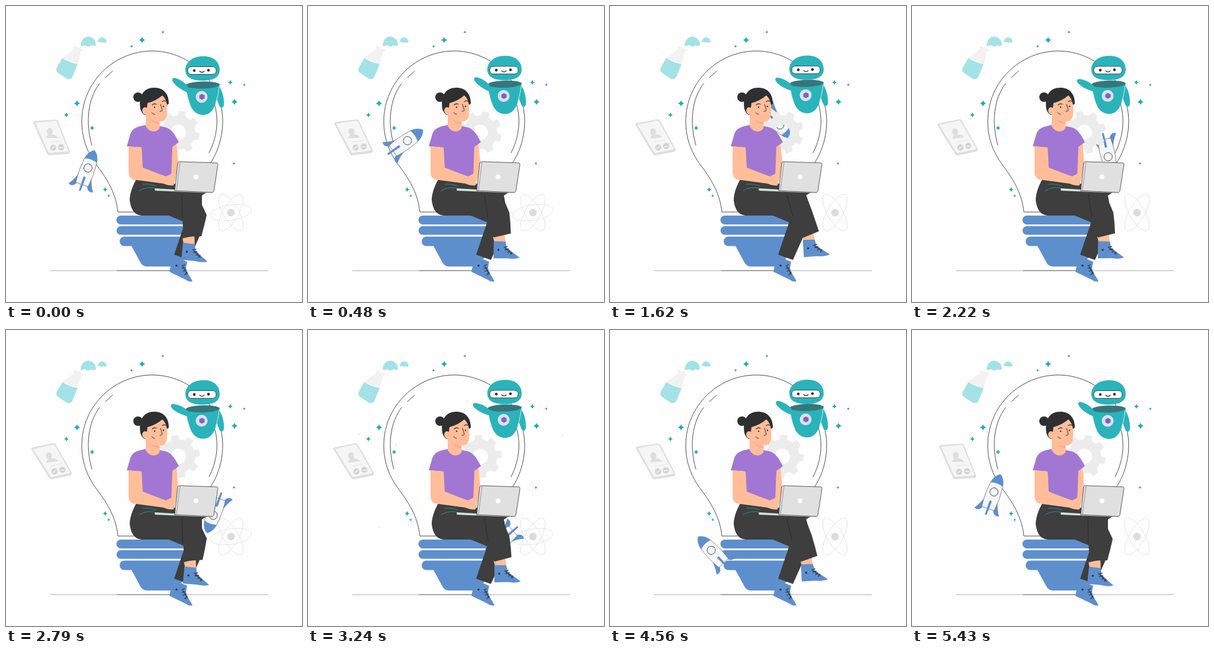
Animation, 500 px wide and 500 px high, one loop 5490 ms. Source, as an HTML page with a canvas:

```html
<!DOCTYPE html>
<html lang="en">
<head>
<meta charset="utf-8">
<title>Idea bulb</title>
<style>
html, body { margin: 0; width: 100%; height: 100%; overflow: hidden; background: #fefefe; }
canvas { display: block; width: 500px; height: 500px; }
</style>
</head>
<body>
<canvas id="stage"></canvas>
<script>
const LOOP = 5490, CYCLE = 5430, SWING = CYCLE / 2;
const BLUE = '#5e8fcd', TEAL = '#2bb3bb', SKIN = '#ffbe99', DARK = '#3e3e3e', INK = '#2d2f31';
const canvas = document.getElementById('stage');
const ctx = canvas.getContext('2d');
const dpr = window.devicePixelRatio || 1;
canvas.width = canvas.height = 500 * dpr;

const paths = {};
const path = d => paths[d] || (paths[d] = new Path2D(d));
const lerp = (a, b, k) => a + (b - a) * k;

function fill(color, d) {
  ctx.fillStyle = color;
  ctx.fill(path(d));
}
function line(color, width, d) {
  ctx.strokeStyle = color;
  ctx.lineWidth = width;
  ctx.stroke(path(d));
}
function oval(color, x, y, rx, ry = rx, tilt = 0) {
  ctx.beginPath();
  ctx.ellipse(x, y, rx, ry, tilt, 0, Math.PI * 2);
  ctx.fillStyle = color;
  ctx.fill();
}
function ring(color, width, x, y, rx, ry = rx, tilt = 0) {
  ctx.beginPath();
  ctx.ellipse(x, y, rx, ry, tilt, 0, Math.PI * 2);
  ctx.strokeStyle = color;
  ctx.lineWidth = width;
  ctx.stroke();
}
function posed(x, y, degrees, draw) {
  ctx.save();
  ctx.translate(x, y);
  ctx.rotate(degrees * Math.PI / 180);
  draw();
  ctx.restore();
}
// turn a drawing about a pivot given in stage coordinates
function turned(x, y, degrees, draw) {
  posed(x, y, degrees, () => { ctx.translate(-x, -y); draw(); });
}

// time, x, y, heading
const flight = [
  [0, 138.5, 273.5, -70], [960, 214, 194, 0], [1620, 287, 201, 43],
  [2790, 350, 313, 110], [3720, 272, 394, 172], [4560, 171, 372, 226]
];
function flightKey(i) {
  const n = flight.length, lap = Math.floor(i / n);
  const [t, x, y, a] = flight[i - lap * n];
  return [t + lap * CYCLE, x, y, a + lap * 360];
}
function flightAt(t) {
  let i = 0;
  while (flightKey(i + 1)[0] <= t) i++;
  const [p, a, b, n] = [-1, 0, 1, 2].map(o => flightKey(i + o));
  const span = b[0] - a[0], k = (t - a[0]) / span;
  return [1, 2, 3].map(c => {
    const va = (b[c] - p[c]) / (b[0] - p[0]) * span;
    const vb = (n[c] - a[c]) / (n[0] - a[0]) * span;
    const k2 = k * k, k3 = k2 * k;
    return (2 * k3 - 3 * k2 + 1) * a[c] + (k3 - 2 * k2 + k) * va
      + (3 * k2 - 2 * k3) * b[c] + (k3 - k2) * vb;
  });
}

function bulb() {
  line('#4a4a4a', 1, 'M225 348H189C186 320 175 298 154 270C135 245 128 220 128 195C128 128 183 76 247 76C312 76 366 130 366 195C366 225 355 255 340 272');
  line('#4a4a4a', 1, 'M168 121L180 110M158 131C138 157 134 197 145 235M352 165C361 195 355 225 343 248');
}

function ground() {
  line('#a6a6a6', 1, 'M75 447H442');
  line('#777', 1, 'M188 447H302');
}

function base() {
  fill(BLUE, 'M194 354H280L303 363V369H194A7.5 7.5 0 0 1 194 354Z');
  fill(BLUE, 'M194 372H303V386.500H194A7.250 7.250 0 0 1 194 372Z');
  fill(BLUE, 'M200 389.500H303V420L284 440H237Q230 439 227 433L212 405.500H200A8 8 0 0 1 200 389.500Z');
}

function flask() {
  fill('#f2f2f2', 'M115 67L131 74L129 77L127 76L121 98L95 88L116 72L114 71Z');
  fill('#a3e2e6', 'M95 88Q108 96 121 98L112 120Q109 125 103 123L88 113Q83 109 86 104Z');
  fill('#a3e2e6', 'M126 67C127 55 135 51 141 52Q151 54 152 66Q148 69 144 66Q139 71 134 66Q129 68 126 67Z');
  fill('#a3e2e6', 'M155 61Q156 53 163 53Q169 54 170 61Q167 63 165 61Q162 63 160 61Z');
}

function phone(t) {
  const lean = -8 * Math.pow(Math.sin(Math.PI * t / CYCLE), 0.6);
  turned(77, 222, lean, () => {
    fill('#dedede', 'M46 197Q46 194 50 194L84 192Q87 192 88 195L108 245Q109 249 105 250L73 252Q70 252 69 249Z');
    fill('#f6f6f6', 'M49 197L83 194Q85 194 86 196L105 243Q106 246 103 246L74 248Q72 248 71 246Z');
    oval('#dedede', 74, 212, 5, 6);
    fill('#dedede', 'M68 223Q69 216 76 217Q84 216 88 223Z');
    line('#e6e6e6', 1, 'M74 230L94 228');
    oval('#d2d2d2', 79.5, 239.5, 5.2);
    oval('#d2d2d2', 93, 238.5, 5.2);
    line('#fff', 1.3, 'M77 241L82 238M90 239H96');
  });
}

function atom(t) {
  const p = t / SWING % 1, gray = '#e3e3e3', rad = Math.PI / 180;
  ring(gray, 1, 380, 349, 35, 13, 60 * rad);
  ring(gray, 1, 380, 349, 35, 13, -60 * rad);
  if (p < 0.5) ring(gray, 1, 380, 349, 35, 13, -9 * rad);
  oval('#dcdcdc', 380, 349, 6.5);
}

const stars = [
  [230, 57.5, 5.500], [212, 68, 2.500], [265, 44, 2.500], [120, 164.5, 5.500],
  [102, 184, 4], [145.5, 206, 4], [167.5, 310, 4], [173.5, 320.5, 2.500],
  [379, 129, 4], [402.5, 133, 2.500], [386, 162, 5.500], [385, 266, 2.500]
];
const specks = [[86, 176], [223, 71], [268, 120], [430, 178], [380, 278], [121, 333], [170, 329], [149, 194]];
function sparkle(t) {
  ctx.fillStyle = '#25abb0';
  for (const [x, y, r] of stars) {
    const c = r * 0.2;
    ctx.beginPath();
    ctx.moveTo(x, y - r);
    ctx.quadraticCurveTo(x + c, y - c, x + r, y);
    ctx.quadraticCurveTo(x + c, y + c, x, y + r);
    ctx.quadraticCurveTo(x - c, y + c, x - r, y);
    ctx.quadraticCurveTo(x - c, y - c, x, y - r);
    ctx.fill();
  }
  const glow = 1 - Math.abs(t - 3750) / 850;
  if (glow <= 0) return;
  ctx.globalAlpha = glow;
  specks.forEach(([x, y], i) => oval(i % 2 ? '#8d8d95' : '#d6a0a8', x, y, 1));
  ctx.globalAlpha = 1;
}

function rocket(t) {
  const [x, y, heading] = flightAt(t);
  posed(x, y, heading, () => {
    fill(BLUE, 'M-8 -10Q-25 -14 -36 -22Q-40 -14 -30 -9Z');
    fill(BLUE, 'M-8 10Q-25 14 -36 22Q-40 14 -30 9Z');
    fill('#f5f6f8', 'M-30 -11Q-8 -14 13 -11Q17 0 13 11Q-8 14 -30 11Z');
    line('#666', 0.7, 'M13 -11Q-8 -14 -30 -11V11Q-8 14 13 11');
    fill(BLUE, 'M13 -11.500Q27 -9 32 0Q27 9 13 11.500Q17 0 13 -11.500Z');
    oval('#f5f6f8', 0, 0, 7);
    ring('#444', 0.9, 0, 0, 7);
    fill(BLUE, 'M-41 -1.500L-17 -2Q-14 0 -17 2L-41 1.500Z');
  });
}

function gear(t) {
  const teeth = 8, step = Math.PI * 2 / teeth;
  posed(291, 213.5, 12 + 45 * t / CYCLE, () => {
    ctx.beginPath();
    for (let i = 0; i < teeth; i++) {
      for (const [o, r] of [[-0.3, 29], [-0.2, 36.500], [0.2, 36.500], [0.3, 29]]) {
        const a = (i + o) * step;
        ctx.lineTo(r * Math.cos(a), r * Math.sin(a));
      }
    }
    ctx.closePath();
    ctx.moveTo(13, 0);
    ctx.arc(0, 0, 13, 0, Math.PI * 2);
    ctx.fillStyle = '#ececec';
    ctx.fill('evenodd');
  });
}

function head() {
  fill(SKIN, 'M236 180V203Q241 212 250 212Q259 211 260 203L259 190Z');
  fill('#f7a98a', 'M244 191Q251 197 259 196V199Q249 199 244 191Z');
  oval(INK, 223, 154, 8);
  fill(INK, 'M227 174C223 150 234 138 250 138C266 138 275 148 275 165L268 170L240 183L234 184Q229 181 227 174Z');
  fill(SKIN, 'M239 164Q254 160 264 151Q270 156 272 167Q274 186 268 193Q262 197 252 194Q243 192 238 184Q230 183 230 176Q232 169 238 172Z');
  line(INK, 1.2, 'M247 167Q250 164 254 166M264 161.500Q267 159 270 161');
  line(INK, 1, 'M261 166L264 176Q264 178 260 178M246 180Q248 183 251 183');
  oval(INK, 251, 171, 1.2);
  oval(INK, 266, 169.5, 1.2);
}

function shoe() {
  fill(BLUE, 'M327 395L347 394L350 404Q361 412 373 419Q366 423 352 422L329 424Z');
  oval(INK, 336, 409, 1.7);
  line(INK, 1.2, 'M345 404L351 402M347 408L353 406M352 412L355 409M357 415L359 411M347 405L360 414');
}

const bentShin = [[297, 318], [298, 360], [300, 390], [330, 389], [335, 370], [339, 353], [331, 336], [330, 318]];
const outShin = [[299, 320], [309, 354], [326, 392], [354, 380], [348, 364], [341, 345], [335, 329], [331, 318]];
function legs(swing) {
  // planted leg
  fill(BLUE, 'M282 422L306 432L304 442C306 452 312 458 315 465Q310 467 303 462L276 449Z');
  oval(INK, 288, 438.5, 1.7);
  line(INK, 1.2, 'M297 439L302 437M297 443L303 442M299 448L304 446M302 454L306 450M299 440L306 453');
  fill(DARK, 'M303 355L330 350V382L309 429L284 420L303 364Z');
  fill(DARK, 'M220 293C213 305 209 318 209 328C211 344 217 354 232 354H275L304 366L331 345V320L339 315L284 300Z');

  // swinging leg
  const rest = 1 - swing;
  ctx.save();
  ctx.translate(-28 * rest, 5 * rest);
  turned(328, 395, 10 * rest, () => {
    fill(SKIN, 'M325 388L344 380L347 395L328 396Z');
    shoe();
  });
  ctx.restore();
  const shin = bentShin.map(([x, y], i) => [lerp(x, outShin[i][0], swing), lerp(y, outShin[i][1], swing)]);
  ctx.beginPath();
  shin.forEach(p => ctx.lineTo(...p));
  ctx.fillStyle = DARK;
  ctx.fill();
  ctx.beginPath();
  ctx.moveTo(...shin[0]);
  ctx.lineTo(...shin[1]);
  ctx.strokeStyle = '#252525';
  ctx.lineWidth = 0.8;
  ctx.stroke();
  line('#2a9298', 1, 'M225 312Q239 303 256 309M231 301Q243 300 253 304');
}

function woman(swing) {
  legs(swing);
  fill(SKIN, 'M280 236L288 232L291 265L287 287L276 286Z');
  fill('#a177d3', 'M236 201C220 204 212 207 209 220L204 237L229 239L230 275L279 291L281 238L292 230C286 218 280 208 270 205L260 203Z');
  head();
  fill(SKIN, 'M207 237L229 239L231 273L270 288L282 282L287 288L283 303Q276 304 266 300L214 293Q207 290 207 280Z');
}

function laptop() {
  fill('#cfe2dd', 'M252 308L285 310L349 314V316L252 312Q250 310 252 308Z');
  fill('#e0e0e0', 'M293 263L356 265Q358 265 358 268L351 313Q350 315 348 315L285 312L290 265Q291 263 293 263Z');
  line('#4a4a4a', 0.9, 'M285 312L290 265Q291 263 293 263L356 265Q358 265 358 268L351 313Q350 315 348 315L285 312');
  line('#777', 0.7, 'M288 311L294 264');
  oval('#fff', 321, 288.5, 4);
}

function robot(t, swing) {
  ctx.save();
  ctx.translate(0, -3 * swing);
  fill(TEAL, 'M357 132C365 140 369 155 368 168Q366 174 361 170L354 152Z');
  fill(TEAL, 'M303 134L361 131C357 165 350 184 333 184C315 184 307 165 303 134Z');
  line('#fff', 0.8, 'M360 137Q358 153 354 164M304 139Q307 158 312 170');
  oval('#37757c', 332, 133.5, 28.5, 6, -0.03);
  const lift = -2.2 * (1 - Math.cos(Math.PI * 2 * t / CYCLE));
  turned(308, 142, lift * 2, () =>
    fill(TEAL, 'M309 147C295 142 283 132 281 126Q280 120 287 122C296 125 303 130 307 136Z'));
  oval('#d6e5f2', 330.5, 153.5, 10);
  fill('#8c5cc5', 'M331 148.500L335.500 151V156L331 158.500L326.500 156V151Z');
  ctx.restore();

  ctx.save();
  ctx.translate(0, -1.2 * swing);
  fill(TEAL, 'M332 85C350 84 361 94 361 108C361 121 349 126 332 126C315 126 303 121 303 108C303 95 315 85 332 85Z');
  fill('#fff', 'M313 102.500H349Q355 103 355 109Q355 115 349 115.500H313Q307 115 307 109Q307 103 313 102.500Z');
  line('#2b5155', 1, 'M313 102.500H349Q355 103 355 109Q355 115 349 115.500H313Q307 115 307 109Q307 103 313 102.500Z');
  oval(INK, 318, 109, 2.3);
  oval(INK, 342, 108.5, 2.3);
  line(INK, 1.2, 'M327 110Q331 114 335 110');
  ctx.restore();
}

function draw(now) {
  const t = Math.min(now % LOOP, CYCLE - 0.1);
  const swing = Math.sin(Math.PI * (t / SWING % 1));
  ctx.setTransform(dpr, 0, 0, dpr, 0, 0);
  ctx.fillStyle = '#fefefe';
  ctx.fillRect(0, 0, 500, 500);
  ctx.lineCap = ctx.lineJoin = 'round';
  bulb();
  ground();
  flask();
  phone(t);
  atom(t);
  sparkle(t);
  base();
  rocket(t);
  gear(t);
  woman(swing);
  laptop();
  robot(t, swing);
}

let start;
function tick(now) {
  if (start === undefined) start = now;
  draw(now - start);
  requestAnimationFrame(tick);
}
draw(0);
requestAnimationFrame(tick);
</script>
</body>
</html>
```
